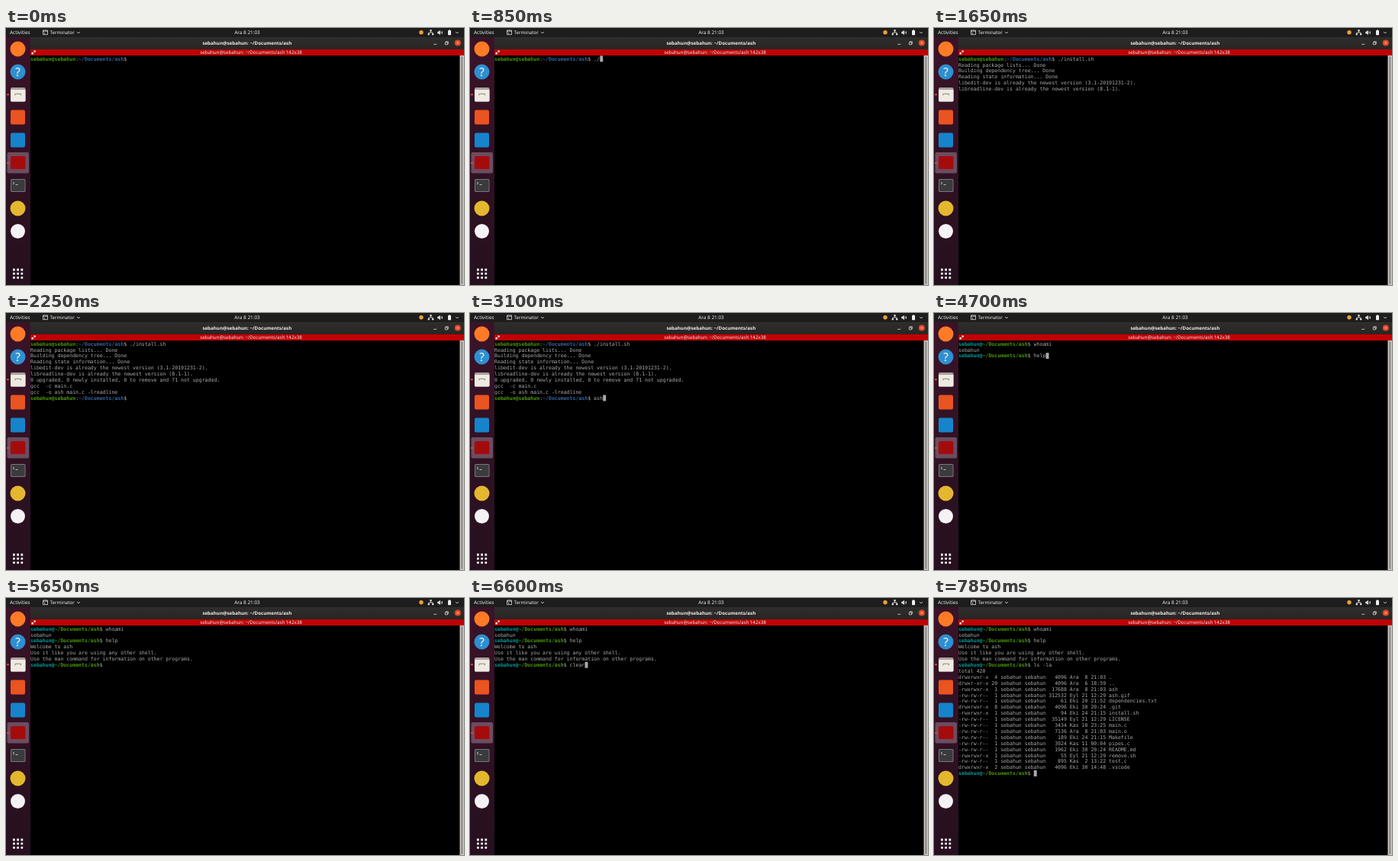
Write an HTML page that moves like this. It is 600 px wide and 337 px high and loops after 8000 ms.

```html
<!DOCTYPE html>
<html lang="en">
<head>
<meta charset="utf-8">
<title>Terminal session</title>
<style>
  html, body { margin: 0; width: 100%; height: 100%; overflow: hidden; background: #000; }
  svg { display: block; width: 100%; height: 100%; }
  text { text-rendering: geometricPrecision; }
  .ui { font: 6.2px "Noto Sans", "Open Sans", sans-serif; fill: #eee; }
  .mid { text-anchor: middle; }
  .bold { font-weight: 700; }
  #screen text { font: 6.56px "DejaVu Sans Mono", monospace; fill: #aaa; white-space: pre; }
  #screen tspan { font-weight: 700; }
  .green { fill: #4e9a06; }
  .blue { fill: #3465a4; }
  .teal { fill: #06989a; }
  .line { fill: none; stroke: #ddd; stroke-width: .8; }
</style>
</head>
<body>
<svg viewBox="0 0 600 337" preserveAspectRatio="none">
  <defs>
    <linearGradient id="dock" x2="0" y2="1">
      <stop stop-color="#3b1328"/><stop offset="1" stop-color="#26101f"/>
    </linearGradient>
    <linearGradient id="bar" x2="0" y2="1">
      <stop stop-color="#302e2c"/><stop offset="1" stop-color="#282624"/>
    </linearGradient>
  </defs>
  <rect width="600" height="337"/>

  <!-- top panel -->
  <rect width="600" height="12" fill="#1d1d1d"/>
  <g class="ui">
    <text x="5" y="8.3" font-size="6.4">Activities</text>
    <text x="57.5" y="8.3">Terminator</text>
    <text class="mid" x="316" y="8.3" style="font-size:6.4px">Ara 8 21:03</text>
  </g>
  <g class="line">
    <path d="M48.5 3h6v5.6h-6zM48.5 4.2h6M50 6l1 .8-1 .8M93 5l2 2 2-2M589 5l2 2 2-2"/>
    <path d="M556.5 3v3M553.8 8.5V6h5.4v2.5M571 4q1.5 2 0 4M569.8 4.8q.8 1.2 0 2.4"/>
  </g>
  <circle cx="544" cy="5.8" r="2.7" fill="#f0a030"/>
  <path fill="#eee" d="M555.3 2.3h2.4v2h-2.4zM552.7 7.3h2.2v2h-2.2zM558.1 7.3h2.2v2h-2.2zM565.3 4.8h1.4l2-2v6.4l-2-2h-1.4zM579 3.2h1v-.8h2v.8h1v6h-4z"/>

  <!-- dock -->
  <rect y="12" width="32" height="325" fill="url(#dock)"/>
  <rect x="1.5" y="163" width="28.5" height="27.5" rx="2" fill="#6b4d60"/>
  <g fill="#e95420"><circle cx="2.5" cy="87.3" r="1.2"/><circle cx="2.5" cy="177" r="1.2"/></g>
  <circle cx="15.5" cy="27.5" r="10" fill="#ff7a26"/>
  <circle cx="15.5" cy="57.5" r="10" fill="#2f8fd0"/>
  <text class="ui mid" x="15.5" y="63" style="font-size:15px;fill:#fff">?</text>
  <rect x="6" y="78" width="19.5" height="18.5" rx="1.8" fill="#a8a298"/>
  <path fill="#efebe4" d="M6 81h19.5v14q0 1.5-1.5 1.5H7.5Q6 96.5 6 95z"/>
  <path fill="none" stroke="#8d867b" stroke-width="1" d="M12 88.5v-2.2h7.5v2.2"/>
  <rect x="6" y="107.5" width="19" height="19" rx="2" fill="#e95420"/>
  <rect x="6" y="137.5" width="19" height="19" rx="2" fill="#1684cb"/>
  <rect x="6" y="168" width="19.5" height="17" rx="1.5" fill="#a50b0d"/>
  <rect x="6" y="198" width="19.5" height="17" rx="1.5" fill="#77777a"/>
  <rect x="7" y="199" width="17.5" height="15" rx="1" fill="#3b3b3d"/>
  <path class="line" d="M9 202l2 1.5-2 1.5M12.5 205.5h3"/>
  <circle cx="15.5" cy="236.5" r="10" fill="#e4b72e"/>
  <circle cx="15.5" cy="266.5" r="9.5" fill="#f4f2f4"/>
  <path stroke="#f2f2f2" stroke-width="2.8" stroke-dasharray="2.8 2.4" d="M9 317h13.2M9 322.2h13.2M9 327.4h13.2"/>

  <!-- window frame -->
  <rect x="32" y="12" width="568" height="16" fill="url(#bar)"/>
  <text class="ui mid bold" x="315.8" y="22.3" id="title"></text>
  <path class="line" d="M560.2 21.3h4M575.3 18.8h3v3h-3zM576.3 18.8v-1h3v3h-1"/>
  <circle cx="591.8" cy="19.5" r="4.1" fill="#e9441f"/>
  <path class="line" stroke="#fff" d="M590.3 18l3 3M593.3 18l-3 3"/>
  <rect x="32" y="28" width="568" height="8" fill="#c00003"/>
  <path fill="#eee" d="M33.5 32h2.4v2.4h-2.4zM36.5 29.5h2.2v2.2h-2.2z"/>
  <text class="ui mid" x="321" y="34.3" id="tab"></text>
  <rect x="594.5" y="36" width="5.5" height="301" fill="#cbc8c5"/>
  <rect x="596" y="37" width="2.6" height="299" rx="1.3" fill="#94908d"/>

  <g id="screen"></g>
  <rect id="cursor" width="3.95" height="7.9" fill="#aaa"/>
</svg>
<script>
const LOOP = 8000, BLINK = 300;
const LEFT = 32, TOP = 36.4, COL = 3.95, ROW = 7.9;
const user = 'sebahun', path = '~/Documents/ash';
const byId = id => document.getElementById(id);
const paint = (name, text) => `<tspan class="${name}">${text}</tspan>`;
const bash = `${paint('green', `${user}@${user}`)}:${paint('blue', path)}$ `;
const ash = `${paint('teal', user + '@')}${paint('green', path)}$ `;

byId('title').textContent = `${user}@${user}: ${path}`;
byId('tab').textContent = `${user}@${user}: ${path} 142x38`;

const steps = [];
let lastKey = -BLINK;

// A key press restarts the cursor blink; program output does not.
function show(time, lines, isKey = false) {
  if (isKey) lastKey = time;
  steps.push({ time, lines, key: lastKey });
}
function type(before, prompt, entries) {
  for (const [time, text] of Object.entries(entries)) show(+time, [...before, prompt + text], true);
}

show(0, [bash]);
type([], bash, { 750: '.', 850: './', 900: './i', 950: './in', 1000: './ins', 1100: './install.sh' });

const install = [
  bash + './install.sh',
  'Reading package lists... Done',
  'Building dependency tree... Done',
  'Reading state information... Done',
  'libedit-dev is already the newest version (3.1-20191231-2).',
  'libreadline-dev is already the newest version (8.1-1).',
  '0 upgraded, 0 newly installed, 0 to remove and 71 not upgraded.',
  'gcc  -c main.c',
  'gcc  -o ash main.c -lreadline'
];
const output = (time, count, isKey) => show(time, [...install.slice(0, count), ''], isKey);
output(1350, 1, true);
output(1450, 2);
output(1550, 4);
output(1650, 6);
output(2000, 7);
output(2050, 8);
output(2150, 9);
show(2200, [...install, bash]);
type(install, bash, { 2950: 'a', 3000: 'as', 3100: 'ash' });

show(3150, [ash]);
type([], ash, { 3550: 'w', 3600: 'wh', 3650: 'who', 3700: 'whoa', 3750: 'whoami' });
const who = [ash + 'whoami', user];
show(3900, [...who, ash], true);
type(who, ash, { 4550: 'h', 4600: 'he', 4650: 'hel', 4700: 'help' });
const help = [
  ...who,
  ash + 'help',
  'Welcome to ash',
  'Use it like you are using any other shell.',
  'Use the man command for information on other programs.'
];
show(4750, [...help, ash], true);
type(help, ash, {
  6450: 'c', 6500: 'cl', 6550: 'cle', 6600: 'clear', 7000: 'cle', 7050: 'c', 7100: '',
  7250: 'l', 7300: 'ls', 7400: 'ls ', 7450: 'ls -', 7550: 'ls -l', 7600: 'ls -la'
});

const modes = { d: 'drwxrwxr-x', r: 'drwxr-xr-x', x: '-rwxrwxr-x', f: '-rw-rw-r--' };
const listing = `d 4 4096 Ara 8 21:03 .
r 20 4096 Ara 6 18:59 ..
x 1 17688 Ara 8 21:03 ash
f 1 312532 Eyl 21 12:29 ash.gif
f 1 61 Eki 20 21:52 dependencies.txt
d 8 4096 Eki 30 20:24 .git
x 1 94 Eki 24 21:15 install.sh
f 1 35149 Eyl 21 12:29 LICENSE
f 1 3434 Kas 10 23:25 main.c
f 1 7136 Ara 8 21:03 main.o
f 1 189 Eki 24 21:15 Makefile
f 1 3924 Kas 11 00:04 pipes.c
f 1 1962 Eki 30 20:24 README.md
x 1 55 Eyl 21 12:29 remove.sh
f 1 895 Kas 2 13:22 test.c
d 2 4096 Eki 30 14:48 .vscode`.split('\n').map(entry => {
  const [mode, links, size, month, day, clock, name] = entry.split(' ');
  return `${modes[mode]} ${links.padStart(2)} ${user} ${user} ${size.padStart(6)} ${month} ${day.padStart(2)} ${clock} ${name}`;
});
show(7850, [...help, ash + 'ls -la', 'total 420', ...listing, ash], true);

const screen = byId('screen'), cursor = byId('cursor');
let current;

function render(step) {
  screen.innerHTML = step.lines.map((line, row) =>
    `<text x="${LEFT}" y="${TOP + 6.2 + row * ROW}">${line}</text>`).join('');
  cursor.setAttribute('x', LEFT + COL * screen.lastChild.textContent.length);
  cursor.setAttribute('y', TOP + ROW * (step.lines.length - 1));
}

const start = performance.now();
function frame() {
  const time = (performance.now() - start) % LOOP;
  const step = steps.findLast(s => s.time <= time);
  if (step !== current) render(current = step);
  const phase = Math.floor((time - step.key) / BLINK);
  cursor.setAttribute('visibility', phase % 2 ? 'hidden' : 'visible');
  requestAnimationFrame(frame);
}
frame();
</script>
</body>
</html>
```
